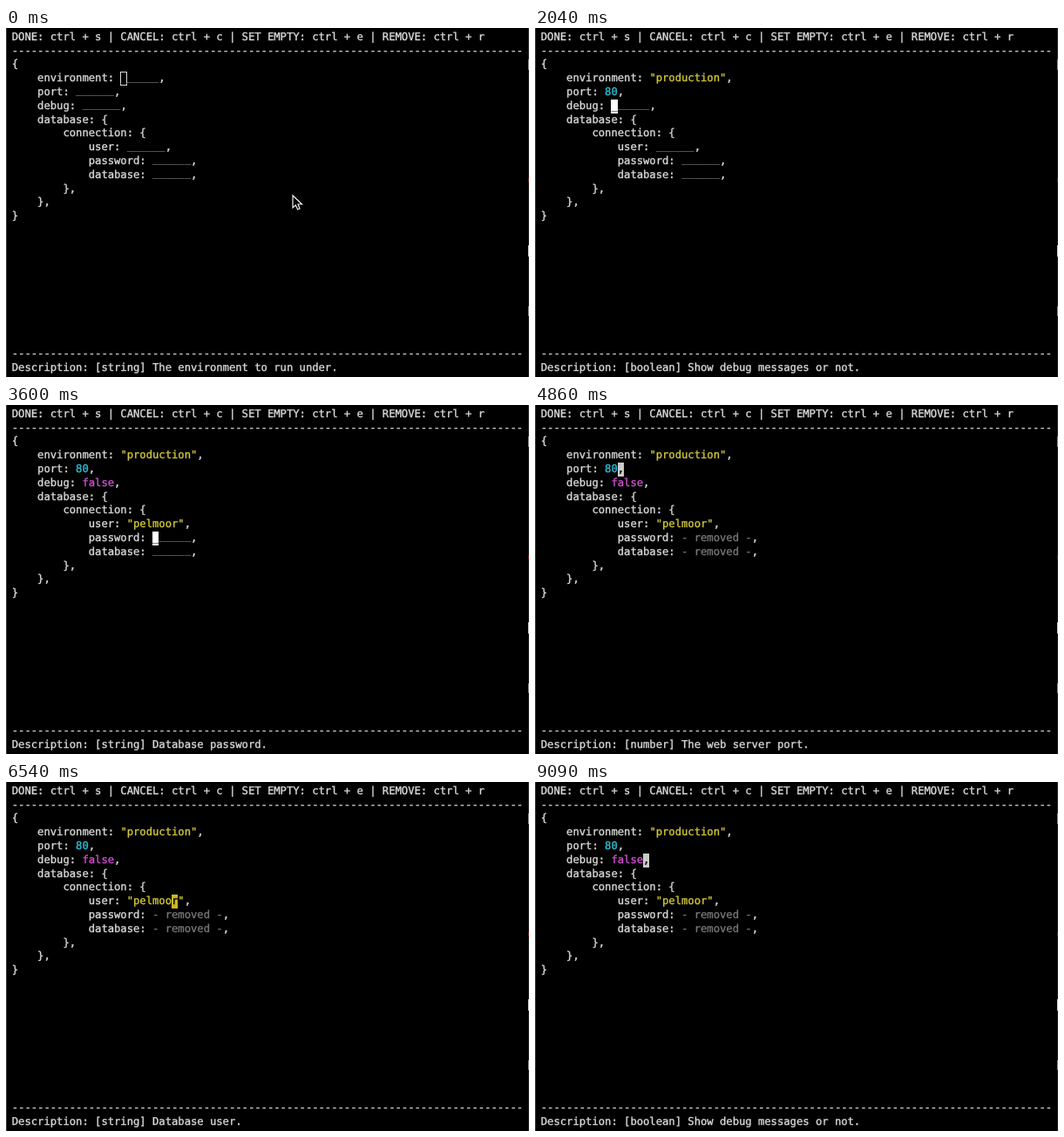
An HTML page for the animation above (9120 ms loop, 600 by 400 pixels).

```html
<!DOCTYPE html>
<html lang="en">
<head>
<meta charset="utf-8">
<title>Config editor</title>
<style>
html, body { margin: 0; width: 100%; height: 100%; overflow: hidden; background: #000; }
#stage { position: relative; width: 600px; height: 400px; overflow: hidden; background: #000; }
pre {
  position: absolute; left: 6.8px; top: 2.8px; margin: 0;
  font: 12.18px/15.8px "DejaVu Sans Mono", "Liberation Mono", monospace;
  font-variant-ligatures: none; text-rendering: geometricPrecision;
  -webkit-text-stroke: .35px; color: #d9d9d7;
}
.string { color: #d3c93a; }
.number { color: #2bbdd3; }
.boolean { color: #d350d2; }
.removed { color: #777; }
.error { color: #ff7868; }
.empty { color: #a4a4a2; position: relative; top: -1.5px; -webkit-text-stroke: 0; }
.cursor { display: inline-block; height: 15.8px; vertical-align: top; color: #000; }
.cursor.plain { background: #cacac8; }
.cursor.string { background: #c9b722; }
.cursor.removed { background: #777; }
.cursor.empty { background: #fff; top: 0; }
.cursor.blur { background: none; box-shadow: inset 0 0 0 1px #d9d9d7; }
#edge { position: absolute; left: 0; top: 0; width: 1px; height: 400px; background: #3c3c38; }
#side {
  position: absolute; left: 599px; top: 0; width: 1px; height: 400px;
  background: linear-gradient(#333 36px, #999 0 48px, #222 0 172px, #822 0 177px, #222 0 249px,
    #ddd 0 262px, #222 0 319px, #999 0 330px, #222 0);
}
svg { position: absolute; left: 0; top: 0; }
</style>
</head>
<body>
<div id="stage">
  <div id="edge"></div>
  <div id="side"></div>
  <pre id="screen"></pre>
  <svg id="mouse" width="600" height="400">
    <path d="M329 192V206L332.3 203 334.6 208 337 207 335 202H339.5Z" fill="#000" stroke="#f0f0ee" stroke-width="1.2"/>
  </svg>
</div>
<script>
const LOOP = 9120, FOCUS = 240, HIDE_MOUSE = 480;
const fields = [
  ["environment", "string", "The environment to run under."],
  ["port", "number", "The web server port."],
  ["debug", "boolean", "Show debug messages or not."],
  ["user", "string", "Database user."],
  ["password", "string", "Database password."],
  ["database", "string", "Database name."]
];

// Key presses: [time, key]
const type = (start, step, text) => [...text].map((c, i) => [start + i * step, c]);
const keys = [
  ...type(600, 78, "production"), [1440, "next"],
  ...type(1620, 120, "80"), [1920, "next"],
  ...type(2160, 84, "false"), [2640, "next"],
  ...type(2790, 90, "pelmoor"), [3480, "next"],
  [3870, "remove"], [4110, "next"], [4350, "remove"],
  [4530, "next"], [4740, "next"], [5250, "next"], [5700, "next"],
  [6300, "left"], [6900, "prev"], [7140, "prev"],
  [7470, "a"], [7710, "check"], [8220, "back"], [8700, "next"]
];

function stateAt(time) {
  const s = { values: fields.map(() => ""), active: 0, pos: 0, error: false };
  const go = step => {
    s.active = (s.active + step + fields.length) % fields.length;
    s.pos = (s.values[s.active] || "").length;
  };
  for (const [at, key] of keys) {
    if (at > time) break;
    const value = s.values[s.active];
    s.error = key === "check";
    if (key === "next") go(1);
    else if (key === "prev") go(-1);
    else if (key === "left") s.pos--;
    else if (key === "remove") s.values[s.active] = null;
    else if (key === "back") s.values[s.active] = value.slice(0, --s.pos);
    else if (key.length === 1) {
      s.values[s.active] = value + key;
      s.pos++;
    }
  }
  return s;
}

const span = (style, text) => text && `<span class="${style}">${text}</span>`;

function drawField(s, i, focused) {
  const [name, kind] = fields[i], value = s.values[i];
  const indent = " ".repeat(i < 3 ? 4 : 12);
  let style = kind, text = value, at = s.pos;
  if (value === null) [style, text, at] = ["removed", "- removed -", 0];
  else if (!value) [style, text, at] = ["empty", "______", 0];
  else if (kind === "string") {
    text = `"${value}"`;
    at++;
  }
  const head = `${indent}${name}: `;
  if (i !== s.active) return head + span(style, text) + ",";
  const blur = focused ? "" : " blur";
  if (at >= text.length) return head + span(style, text) + span("cursor plain" + blur, ",");
  return head + span(style, text.slice(0, at)) +
    span(`cursor ${style}${blur}`, text[at]) + span(style, text.slice(at + 1)) + ",";
}

const screen = document.getElementById("screen");
const mouse = document.getElementById("mouse");
const rule = "-".repeat(80);
let shown = "";

function draw() {
  const t = performance.now() % LOOP, s = stateAt(t);
  const rows = fields.map((_, i) => drawField(s, i, t >= FOCUS));
  const [, kind, about] = fields[s.active];
  const html = [
    "DONE: ctrl + s | CANCEL: ctrl + c | SET EMPTY: ctrl + e | REMOVE: ctrl + r",
    rule, "{", ...rows.slice(0, 3),
    "    database: {", "        connection: {", ...rows.slice(3),
    "        },", "    },", "}", ...Array(9).fill(""), rule,
    s.error ? span("error", "Invalid number") : `Description: [${kind}] ${about}`
  ].join("\n");
  if (html !== shown) screen.innerHTML = shown = html;
  mouse.style.display = t < HIDE_MOUSE ? "" : "none";
  requestAnimationFrame(draw);
}
draw();
</script>
</body>
</html>
```
